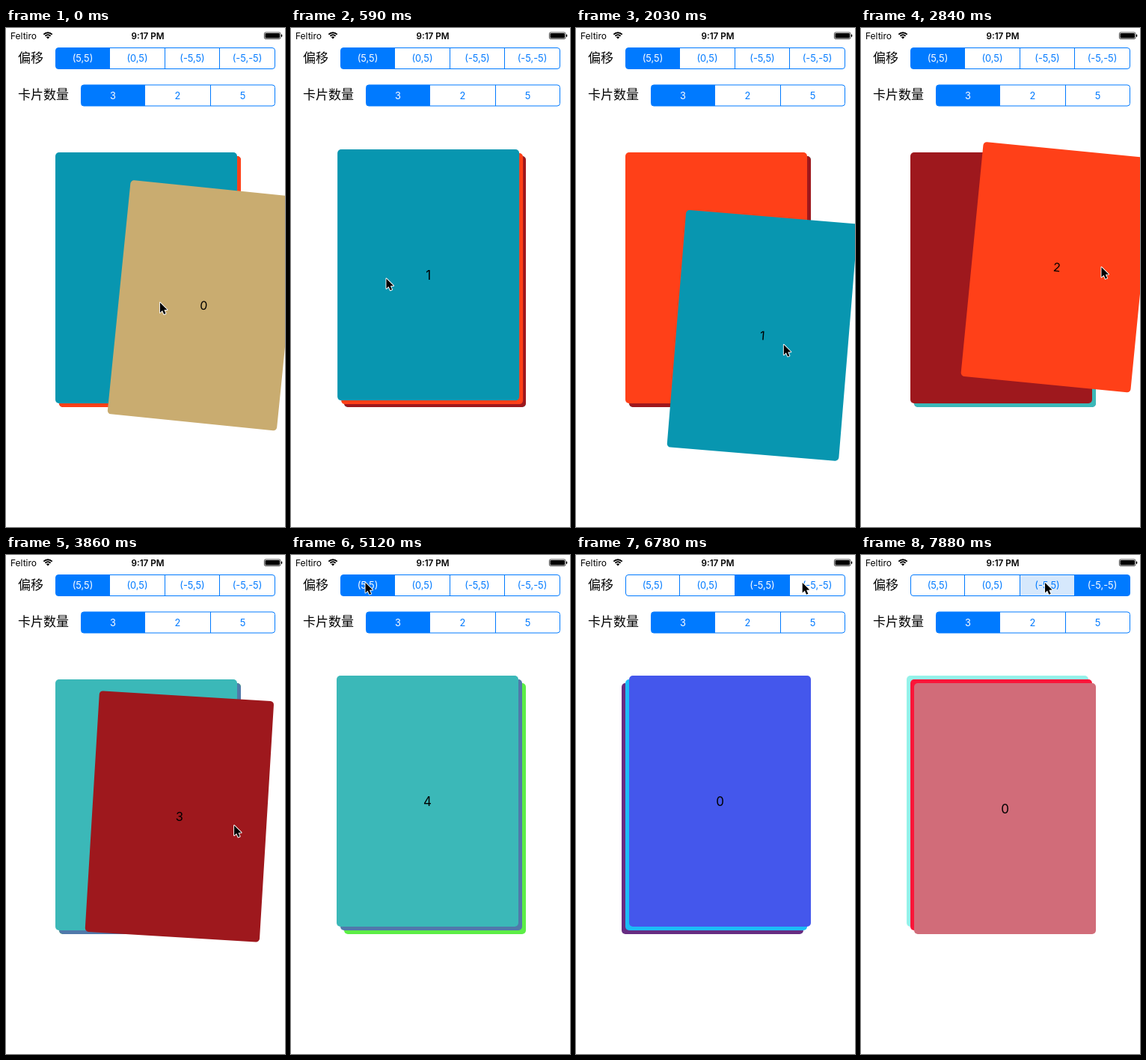
Write an HTML page with a canvas that moves like this. It is 373 px wide and 666 px high and loops after 8000 ms.

```html
<!DOCTYPE html>
<html lang="zh">
<head>
<meta charset="utf-8">
<title>Card stack</title>
<style>
html, body { margin: 0; width: 100%; height: 100%; overflow: hidden; background: #fff; }
canvas { display: block; width: 373px; height: 666px; }
</style>
</head>
<body>
<canvas id="stage"></canvas>
<script>
const W = 373, H = 666, LOOP = 8000;
const BLUE = '#007aff', PRESSED = '#d6e8fc';
const SANS = 'Inter, Roboto, sans-serif';
const CJK = '"Noto Sans CJK SC", "Noto Sans CJK", sans-serif';

const canvas = document.getElementById('stage');
const ctx = canvas.getContext('2d');
const dpr = window.devicePixelRatio || 1;
canvas.width = W * dpr;
canvas.height = H * dpr;

// The stack fills this box; cards shrink to leave room for their offsets.
const BOX = { x: 61, y: 161, w: 253, h: 345 };
const SHOWN = 3, RESTACK = 160;
const GRAB = [185, 335];
const PARKED = [200, 196];
const HOLD = 120, PAUSE = 150;

const clamp = v => Math.max(0, Math.min(1, v));
const ease = v => { v = clamp(v); return v * v * (3 - 2 * v); };
const easeOut = v => 1 - (1 - clamp(v)) ** 3;
const mix = (a, b, k) => a + (b - a) * k;
const mix2 = (p, q, k) => [mix(p[0], q[0], k), mix(p[1], q[1], k)];

// Side to side swing that slowly sinks.
function sway(t) {
  const grip = ease((t - 880) / 200);
  return [grip * 112 * Math.cos((t - 1320) / 835 * Math.PI * 2), grip * (t - 1404) * 0.1306];
}
const still = () => [0, 0];

// A card is held until fling, then speeds off to its goal by end.
// The pointer runs lead ms ahead of the card and lets go at up.
const swipes = [
  { down: -300, fling: -300, up: 200, end: 480, lead: 80, hold: () => [201, 62], goal: [-430, -45], arc: 0 },
  { down: 880, fling: 2160, up: 2200, end: 2440, lead: 45, hold: sway, goal: [430, -20], arc: 0 },
  { down: 2620, fling: 2620, up: 2890, end: 3200, lead: 80, hold: still, goal: [430, -50], arc: 0 },
  { down: 3740, fling: 3740, up: 3900, end: 4160, lead: 80, hold: still, goal: [436, 0], arc: 26 }
];

// Visits to the offset buttons: time and button.
const taps = [[5250, 0], [5640, 1], [6490, 2], [7200, 3], [7880, 2]];

const offsets = [[5, 5], [0, 5], [-5, 5], [-5, -5]];
const palettes = [
  ['#c9ac70', '#0896b0', '#ff4018', '#9e181d', '#3bb8b8', '#5079aa', '#5cee46'],
  ['#e0a23c', '#4c9a6a', '#8a5fc0'],
  ['#4457ec', '#1cbcf7', '#672c82'],
  ['#d16c79', '#fb1539', '#95f2e9']
];
const offsetEdges = [66.5, 138.5, 212.5, 285.5, 359.5];
const countEdges = [100.5, 185.5, 273.5, 359.5];

function dragAt(s, t) {
  const u = clamp((t - s.fling) / (s.end - s.fling));
  const [x, y] = mix2(s.hold(Math.min(t, s.fling)), s.goal, u ** 1.75);
  return [x, y + s.arc * Math.sin(Math.PI * u)];
}

function held(s, t) {
  const [x, y] = dragAt(s, Math.max(s.down, t + s.lead));
  return [GRAB[0] + x, GRAB[1] + y];
}

const button = i => [(offsetEdges[i] + offsetEdges[i + 1]) / 2 - 3, 37];

function pointerAt(t) {
  let from, left;
  for (const s of swipes) {
    const down = s.down - s.lead;
    if (t < down) return mix2(from, GRAB, ease((t - left) / (down - left)));
    if (t <= s.up) return held(s, t);
    from = held(s, s.up);
    left = s.up;
  }
  if (t < 4710) return mix2(from, PARKED, ease((t - left) / (4320 - left)));
  from = PARKED;
  left = 4710;
  for (const [time, i] of taps) {
    if (t < time + HOLD) return mix2(from, button(i), easeOut((t - left) / (time - PAUSE - left)));
    from = button(i);
    left = time + HOLD;
  }
  return from;
}

function text(str, x, y, size, color, align = 'center', font = SANS, weight = 400) {
  ctx.font = `${weight} ${size}px ${font}`;
  ctx.fillStyle = color;
  ctx.textAlign = align;
  ctx.textBaseline = 'alphabetic';
  ctx.fillText(str, x, y);
}

function roundRect(x, y, w, h, r) {
  ctx.beginPath();
  ctx.roundRect(x, y, w, h, r);
}

function statusBar() {
  text('Feltiro', 6, 14.5, 12, '#000', 'left');
  ctx.fillStyle = ctx.strokeStyle = '#000';
  ctx.lineWidth = 1.9;
  for (const r of [5, 8]) {
    ctx.beginPath();
    ctx.arc(56, 14.3, r, -Math.PI * 0.75, -Math.PI * 0.25);
    ctx.stroke();
  }
  ctx.beginPath();
  ctx.moveTo(56, 14.5);
  ctx.arc(56, 14.5, 3, -Math.PI * 0.75, -Math.PI * 0.25);
  ctx.fill();
  text('9:17 PM', 189.5, 14.5, 11.7, '#000', 'center', SANS, 600);
  ctx.lineWidth = 0.7;
  roundRect(345.4, 5.9, 21.6, 8.7, 1.8);
  ctx.stroke();
  ctx.fillStyle = '#000';
  roundRect(346.5, 7, 19.4, 6.5, 1);
  ctx.fill();
  roundRect(367.8, 8.6, 1.4, 3.3, 0.7);
  ctx.fill();
}

function segments(edges, y, labels, chosen, pressed) {
  const h = 28, x = edges[0], w = edges[labels.length] - x;
  ctx.save();
  roundRect(x, y, w, h, 3.5);
  ctx.clip();
  labels.forEach((_, i) => {
    if (i !== chosen && i !== pressed) return;
    ctx.fillStyle = i === chosen ? BLUE : PRESSED;
    ctx.fillRect(edges[i], y, edges[i + 1] - edges[i], h);
  });
  ctx.restore();
  ctx.strokeStyle = BLUE;
  ctx.lineWidth = 1;
  roundRect(x, y, w, h, 3.5);
  ctx.stroke();
  labels.forEach((label, i) => {
    if (i) {
      ctx.beginPath();
      ctx.moveTo(edges[i], y);
      ctx.lineTo(edges[i], y + h);
      ctx.stroke();
    }
    text(label, (edges[i] + edges[i + 1]) / 2, y + 18.6, 12.8, i === chosen ? '#fff' : BLUE);
  });
}

function card(deck, index, slot, [dx, dy]) {
  const [ox, oy] = offsets[deck], room = SHOWN - 1;
  const w = BOX.w - Math.abs(ox) * room, h = BOX.h - Math.abs(oy) * room;
  const x = BOX.x + ox * slot + (ox < 0 ? -ox * room : 0);
  const y = BOX.y + oy * slot + (oy < 0 ? -oy * room : 0);
  const pull = Math.max(-1, Math.min(1, dx / 320));
  const size = Math.max(0.93, 1 - Math.abs(pull) / 4);
  ctx.save();
  ctx.translate(x + w / 2 + dx, y + h / 2 + dy);
  ctx.rotate(pull * Math.PI / 8);
  ctx.scale(size, size);
  ctx.fillStyle = palettes[deck][index];
  roundRect(-w / 2, -h / 2, w, h, 5);
  ctx.fill();
  text(String(index), 0, 6.2, 17, '#000');
  ctx.restore();
}

function stack(deck, t) {
  let gone = 0, shift = 1, drag = [0, 0];
  if (deck === 0) {
    gone = swipes.filter(s => t >= s.end).length;
    if (gone) shift = ease((t - swipes[gone - 1].end) / RESTACK);
    if (gone < swipes.length) drag = dragAt(swipes[gone], t);
  }
  const count = Math.min(SHOWN + 1, palettes[deck].length - gone);
  for (let i = count - 1; i >= 0; i--) {
    const slot = Math.min(SHOWN - 1, i + 1 - shift);
    card(deck, gone + i, slot, i ? [0, 0] : drag);
  }
}

function pointer([x, y]) {
  ctx.save();
  ctx.translate(x, y);
  ctx.scale(0.92, 0.92);
  const arrow = new Path2D('M0 0V14.6L3.4 11.5 5.8 17 8.3 15.9 5.9 10.6 10.4 10.4Z');
  ctx.lineJoin = 'round';
  ctx.strokeStyle = '#fff';
  ctx.lineWidth = 2;
  ctx.stroke(arrow);
  ctx.fillStyle = '#000';
  ctx.fill(arrow);
  ctx.restore();
}

function draw(t) {
  ctx.setTransform(dpr, 0, 0, dpr, 0, 0);
  ctx.fillStyle = '#fff';
  ctx.fillRect(0, 0, W, H);
  const done = taps.filter(([time]) => t >= time + HOLD).pop();
  const press = taps.find(([time]) => t >= time && t < time + HOLD);
  const chosen = done ? done[1] : 0;
  statusBar();
  text('偏移', 16, 46.3, 17, '#000', 'left', CJK);
  text('卡片数量', 16, 95.3, 17, '#000', 'left', CJK);
  segments(offsetEdges, 26.5, offsets.map(o => `(${o})`), chosen, press ? press[1] : -1);
  segments(countEdges, 76, ['3', '2', '5'], 0, -1);
  stack(chosen, t);
  pointer(pointerAt(t));
}

const start = performance.now();
function frame() {
  draw((performance.now() - start) % LOOP);
  requestAnimationFrame(frame);
}
frame();
</script>
</body>
</html>
```
